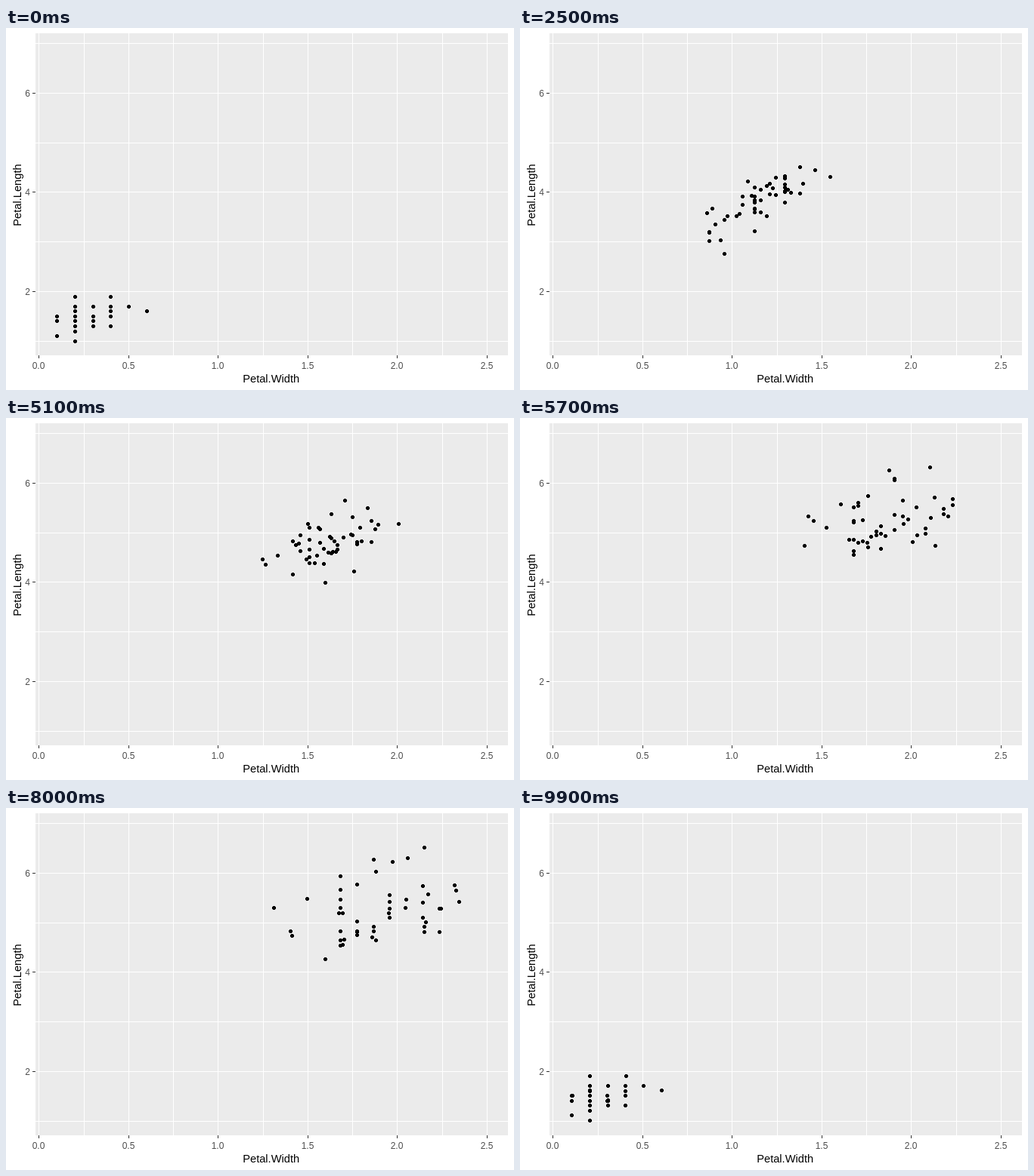
Recreate the animation shown at these times as an HTML page. Size 672 px wide and 480 px high, loop 10000 ms.

```html
<!DOCTYPE html>
<html lang="en">
<head>
<meta charset="utf-8">
<title>Petal scatter plot</title>
<style>
  html, body { margin: 0; width: 100%; height: 100%; overflow: hidden; background: #fff; }
  svg { display: block; font-family: Arial, "Liberation Sans", sans-serif; }
  rect, path { shape-rendering: crispEdges; }
  .tick-label { font-size: 12px; fill: #4d4d4d; }
  .title { font-size: 14.67px; text-anchor: middle; }
</style>
</head>
<body>
<svg width="672" height="480" viewBox="0 0 672 480">
  <rect x="39" y="7" width="625" height="427" fill="#ebebeb"/>
  <g id="axes"></g>
  <text class="title" x="350.7" y="470">Petal.Width</text>
  <text class="title" transform="translate(20 221.5) rotate(-90)">Petal.Length</text>
  <path id="dots"/>
</svg>
<script>
// Measurements in tenths of a unit; equal indices travel together.
const setosa = {
  length: [14,14,13,15,14,17,14,15,14,15,15,16,14,11,12,15,13,14,17,15,17,15,10,17,19,
           16,16,15,14,16,16,15,15,14,15,12,13,14,13,15,13,13,13,16,19,14,16,14,15,14],
  width: [2,2,2,2,2,4,3,2,2,1,2,2,1,1,2,4,4,3,3,3,2,4,2,5,2,
          2,4,2,2,2,2,4,1,2,2,2,2,1,2,2,3,3,2,6,4,3,2,2,2,2]
};
const versicolor = {
  length: [47,45,49,40,46,45,47,33,46,39,35,42,40,47,36,44,45,41,45,39,48,40,49,47,43,
           44,48,50,45,35,38,37,39,51,45,45,47,44,41,40,44,46,40,33,42,42,42,43,30,41],
  width: [14,15,15,13,15,13,16,10,13,14,10,15,10,14,13,14,15,10,15,11,18,13,15,12,13,
          14,14,17,15,10,11,10,12,16,15,16,15,13,13,13,12,14,12,10,13,12,13,13,11,13]
};
const virginica = {
  length: [60,51,59,56,58,66,45,63,58,61,51,53,55,50,51,53,55,67,69,50,57,49,67,49,57,
           60,48,49,56,58,61,64,56,51,56,61,56,55,48,54,56,51,51,59,57,52,50,52,54,51],
  width: [25,19,21,18,22,21,17,18,18,25,20,19,21,20,24,23,18,22,23,15,23,20,20,18,21,
          18,18,18,21,16,19,20,22,15,14,23,24,18,18,21,24,23,19,23,25,23,19,20,23,18]
};

const LOOP = 10000, STEP = 100;
const transitions = [
  { from: setosa, to: versicolor, start: 1100, end: 3300 },
  { from: versicolor, to: virginica, start: 4500, end: 6700 },
  { from: virginica, to: setosa, start: 7900, end: 10000 }
];

const scaleX = width => Math.round(43.4 + width * 237);
const scaleY = length => Math.round(480.43 - length * 65.75);

function drawAxes() {
  const bar = (x, y, w, h, color) => `<rect x="${x}" y="${y}" width="${w}" height="${h}" fill="${color}"/>`;
  const label = (x, y, anchor, text) =>
    `<text class="tick-label" x="${x}" y="${y}" text-anchor="${anchor}">${text}</text>`;
  let markup = "";
  for (let i = 0; i <= 10; i++) {
    const x = scaleX(i / 4);
    markup += bar(x, 7, 1, 427, "#fff");
    if (i % 2 === 0) markup += bar(x, 434, 1, 4, "#333") + label(x, 452, "middle", (i / 4).toFixed(1));
  }
  for (let value = 1; value <= 7; value++) {
    const y = scaleY(value);
    markup += bar(39, y, 625, 1, "#fff");
    if (value % 2 === 0) markup += bar(35, y, 4, 1, "#333") + label(32, y + 5, "end", value);
  }
  document.getElementById("axes").innerHTML = markup;
}

const mix = (a, b, t) => a + (b - a) * t;
const dot = (x, y) => `M${x - 1} ${y - 2}h3v1h1v3h-1v1h-3v-1h-1v-3h1z`;
const dots = document.getElementById("dots");

function drawDots(ms) {
  const time = Math.floor(ms / STEP) * STEP;
  const { from, to, start, end } = transitions.find(part => time <= part.end) && 
    (transitions.filter(part => time >= part.start).pop() || transitions[0]);
  const progress = Math.min(1, Math.max(0, (time - start) / (end - start)));
  const eased = Math.sin(progress * Math.PI / 2);
  dots.setAttribute("d", from.length.map((length, i) => dot(
    scaleX(mix(from.width[i], to.width[i], eased) / 10),
    scaleY(mix(length, to.length[i], eased) / 10)
  )).join(""));
}

function frame() {
  drawDots(performance.now() % LOOP);
  requestAnimationFrame(frame);
}

drawAxes();
frame();
</script>
</body>
</html>
```
